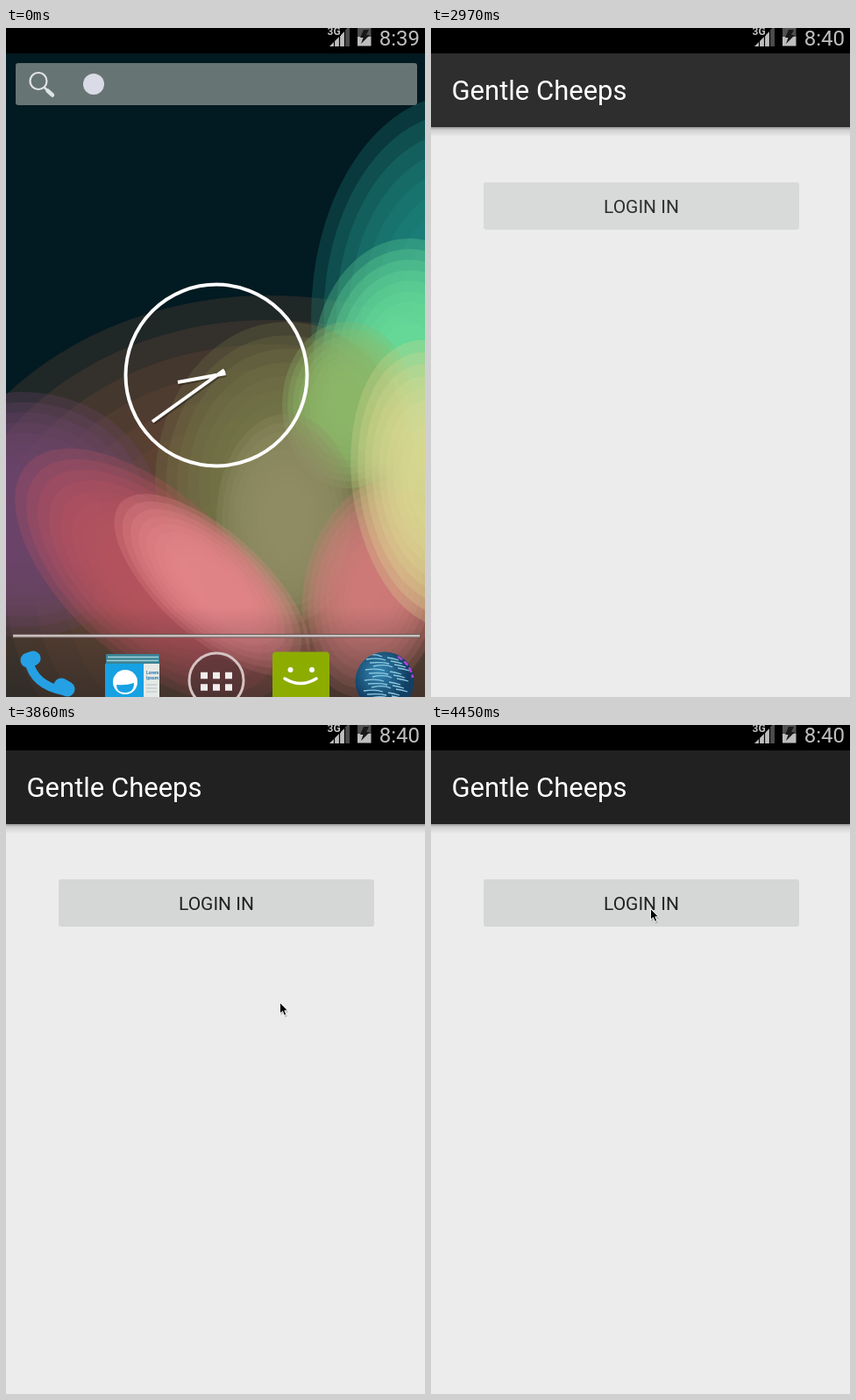
An HTML page that plays this animation: 478 px wide and 763 px high, repeating every 8000 ms.

```html
<!DOCTYPE html>
<html lang="en">
<head>
<meta charset="utf-8">
<title>Phone launch</title>
<style>
html, body { margin: 0; height: 100%; overflow: hidden; background: #000; }
svg { display: block; width: 100vw; height: 100vh; }
text { font-family: Roboto, "Liberation Sans", sans-serif; }
</style>
</head>
<body>
<svg viewBox="0 0 478 763">
  <defs>
    <linearGradient id="shade" x2="0" y2="1">
      <stop stop-color="#000" stop-opacity=".36"/>
      <stop offset=".3" stop-color="#000" stop-opacity=".12"/>
      <stop offset="1" stop-color="#000" stop-opacity="0"/>
    </linearGradient>
    <linearGradient id="dusk" x2="0" y2="1">
      <stop stop-color="#161d20" stop-opacity="0"/>
      <stop offset="1" stop-color="#161d20" stop-opacity=".4"/>
    </linearGradient>
    <radialGradient id="ocean" cx=".4" cy=".35">
      <stop stop-color="#3488b4"/><stop offset="1" stop-color="#123f63"/>
    </radialGradient>
    <clipPath id="globe"><circle cx="432" cy="745" r="33.5"/></clipPath>
  </defs>

  <g id="home">
    <rect width="478" height="763" fill="#021a21"/>
    <g id="wallpaper"></g>
    <rect y="660" width="478" height="103" fill="url(#dusk)"/>

    <!-- search bar -->
    <rect x="11" y="40" width="458" height="48" rx="3" fill="#677474"/>
    <g fill="none" stroke="#dfe3e3" stroke-linecap="round">
      <circle cx="37" cy="60.5" r="9.5" stroke-width="2.2"/>
      <path d="M44 68L47 71" stroke-width="2.5"/>
      <path d="M47.5 71.5L53 76.5" stroke-width="4.5"/>
    </g>
    <circle cx="100" cy="64" r="12" fill="#d9dbe6"/>

    <!-- clock -->
    <g fill="none" stroke="#fff" stroke-width="4">
      <circle cx="240" cy="396" r="103.5"/>
      <path d="M197 406L251 396M168 451L250 392" stroke="#000" stroke-opacity=".3"/>
      <path d="M196 404L250.5 394M167 449L249 390"/>
    </g>

    <!-- dock -->
    <rect x="8" y="691" width="464" height="4.5" fill="#6b5a5a"/>
    <rect x="8" y="692" width="464" height="2.5" fill="#c9bfbd"/>

    <g fill="none" stroke="#25a0e4" stroke-linecap="round">
      <path d="M26 722Q32 750 66 756" stroke-width="10"/>
      <path d="M25 721L31 719M63 750L70 754" stroke-width="17"/>
    </g>

    <rect x="114" y="714" width="61" height="12" rx="1" fill="#3c8394"/>
    <path d="M116 717.5H174M115 721.5H174" stroke="#a5d2da" stroke-width="1.5"/>
    <rect x="113" y="725" width="45" height="40" fill="#16a1e3"/>
    <rect x="157" y="725" width="18" height="40" fill="#e5e9e6"/>
    <circle cx="136" cy="746" r="14" fill="#fff"/>
    <path d="M126 749Q137 750 146 747Q146 758 136 758T126 749Z" fill="#16a1e3"/>
    <g font-size="5" font-weight="700" fill="#2578b3">
      <text x="160" y="737">Lorem</text>
      <text x="160" y="743">Ipsum</text>
    </g>
    <path d="M160 749H172M160 753H172M160 757H172" stroke="#b3c0c0"/>

    <circle cx="240" cy="744" r="31" fill="#482f30" fill-opacity=".5" stroke="#d5c3c2" stroke-width="3"/>
    <path d="M222 738.5H258M222 752H258" stroke="#f2eeee" stroke-width="7.5" stroke-dasharray="8 6"/>

    <rect x="304" y="711.5" width="65" height="60" rx="4" fill="#8dac00"/>
    <g fill="#fff"><circle cx="324.5" cy="732" r="3"/><circle cx="349" cy="732" r="3"/></g>
    <path d="M318 742Q336 753 354 742" fill="none" stroke="#fff" stroke-width="3.5" stroke-linecap="round"/>

    <circle cx="432" cy="745" r="33.5" fill="url(#ocean)"/>
    <g id="ripples" clip-path="url(#globe)" fill="none" stroke="#8dc8df" stroke-width="1.3"></g>
    <path d="M447 717Q461 725 464 741" fill="none" stroke="#b344e0" stroke-width="2.5" stroke-dasharray="6 3"/>
  </g>

  <g id="app">
    <rect width="478" height="763" fill="#ececec"/>
    <rect id="barShade" width="478" height="11" fill="url(#shade)"/>
    <g id="page">
      <rect y="29" width="478" height="84" class="dark"/>
      <text x="23.5" y="82" font-size="31" fill="#fff">Gentle Cheeps</text>
      <rect id="button" x="60" y="176" width="360" height="54" rx="3"/>
      <text x="240" y="211" font-size="21" text-anchor="middle" class="dark">LOGIN IN</text>
    </g>
  </g>

  <!-- status bar -->
  <rect width="478" height="29"/>
  <g fill="#bebebe">
    <path d="M369 21L392 -2V21Z"/>
    <path d="M387 3L392 -2V21H387Z" fill="#4b4b4b"/>
    <path d="M374.5 0V21M380.5 0V21M386.5 0V21" stroke="#000" stroke-width="1.2"/>
    <rect x="366" width="16" height="9"  fill="#000"/>
    <text x="366.5" y="8" font-size="12" font-weight="700">3G</text>
    <rect x="401" width="15.5" height="11" fill="#505050"/>
    <rect x="401" y="10" width="15.5" height="10.5"/>
    <path d="M408 2H414L411 8H415L405 18L407.5 11H404Z" fill="#181818"/>
    <text id="time" x="472" y="19.5" font-size="24" text-anchor="end"></text>
  </g>

  <g id="cursor">
    <path d="M0 0V12.5L3 10L5 14.7L7.3 13.7L5.3 9.3H9Z" transform="translate(1 2)" fill-opacity=".2"/>
    <path d="M0 0V12.5L3 10L5 14.7L7.3 13.7L5.3 9.3H9Z" stroke="#fff" stroke-width=".9"/>
  </g>
</svg>

<script>
const $ = id => document.getElementById(id);

function add(parent, tag, attrs) {
  const el = document.createElementNS("http://www.w3.org/2000/svg", tag);
  for (const name in attrs) el.setAttribute(name, attrs[name]);
  parent.append(el);
}

// Stepped glow: concentric translucent ellipses that build up to one colour.
function glow(color, x, y, rx, ry, turn = 0) {
  const rings = 9;
  for (let i = 0; i < rings; i++) {
    const scale = 1 - 0.75 * i / rings;
    add($("wallpaper"), "ellipse", {
      rx: rx * scale, ry: ry * scale, fill: color, "fill-opacity": 0.28,
      transform: `translate(${x} ${y}) rotate(${turn})`
    });
  }
}

glow("#6b4a36", 300, 640, 400, 335);       // brown arch
glow("#1f8a80", 520, 330, 172, 255);       // teal
glow("#68dc98", 460, 385, 110, 145);       // green
glow("#74774a", 320, 520, 150, 185);       // olive
glow("#8cb868", 390, 430, 75, 95);         // lime
glow("#8f8b66", 320, 560, 80, 120);        // grey olive
glow("#d07c7a", 420, 640, 80, 125, 12);    // right pink
glow("#dcd890", 490, 520, 95, 165, -8);    // yellow
glow("#6b476c", 20, 555, 155, 140);        // purple
glow("#b8545e", 165, 625, 190, 95, 42);    // red
glow("#e0858a", 235, 635, 140, 60, 42);    // pink

// globe lines
for (let i = 0; i < 14; i++) {
  const x = 407 + i * 17 % 13, y = 716 + i * 4;
  add($("ripples"), "path", { d: `M${x} ${y}q14 ${i % 3 - 3} 22 1m6 1q7 1 13 3` });
}

const show = (id, on) => $(id).style.display = on ? "" : "none";

// The pointer eases to the button in four steps of 150 ms.
function movePointer(t) {
  const left = 1 - Math.min(4, Math.floor((t - 3850) / 150)) / 4;
  const x = 250.5 + 62 * left ** 4, y = 209.5 + 107 * left ** 3.3;
  $("cursor").setAttribute("transform", `translate(${x} ${y})`);
}

function draw(t) {
  const opened = t >= 570, loaded = t >= 2970, settled = t >= 3110, pointing = t >= 3860;
  show("home", !opened);
  show("app", opened);
  show("page", loaded);
  show("cursor", pointing);
  if (pointing) movePointer(t);
  $("time").textContent = opened ? "8:40" : "8:39";
  $("barShade").setAttribute("y", loaded ? 113 : 29);
  $("button").setAttribute("fill", settled ? "#d5d7d6" : "#d8dad9");
  for (const el of document.querySelectorAll(".dark"))
    el.setAttribute("fill", settled ? "#212121" : "#2e2e2e");
}

const start = performance.now();
function tick() {
  draw((performance.now() - start) % 8000);
  requestAnimationFrame(tick);
}
tick();
</script>
</body>
</html>
```
